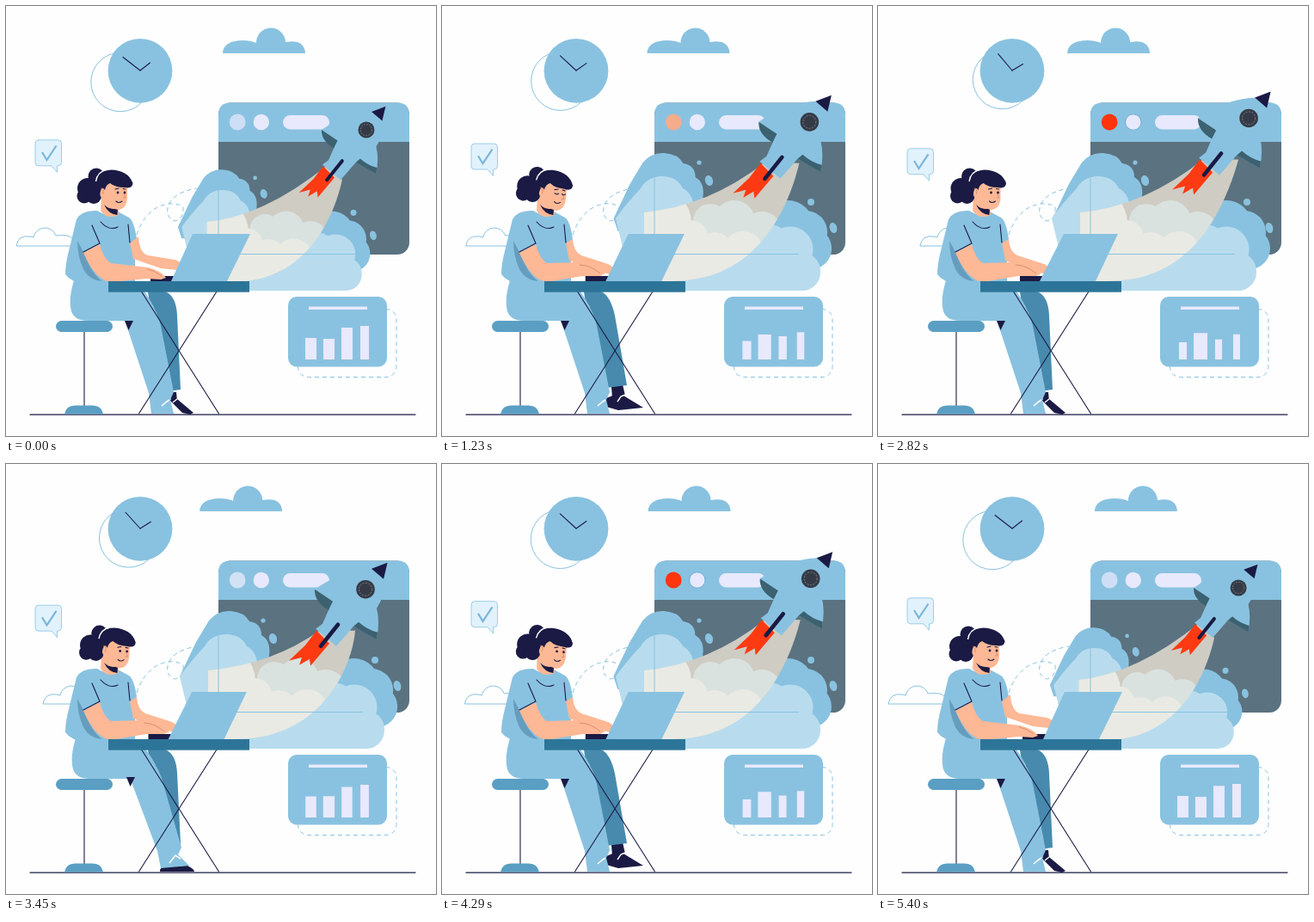
An HTML page for the animation above (5.46 s loop, 500 by 500 pixels).

```html
<!DOCTYPE html>
<html lang="en">
<head>
<meta charset="utf-8">
<title>Launch day</title>
<style>
  html, body { margin: 0; width: 100%; height: 100%; overflow: hidden; background: #fefefe; }
  svg { display: block; width: 100%; height: 100%; }
  .blue { fill: #89c2e0; }
  .mid { fill: #5a9fc3; }
  .dark { fill: #478aad; }
  .navy { fill: #1a1a44; }
  .skin { fill: #fdb895; }
  .pale { fill: #e8e9fc; }
  .light { fill: #b8dcee; }
  .ink { fill: none; stroke: #1a1a44; stroke-width: 1.1; stroke-linecap: round; }
  .thin { fill: none; stroke: #89c2e0; stroke-width: 1; }
  .dash { stroke-dasharray: 5 4; }
  .crease { fill: none; stroke: #c97f66; stroke-width: .7; }
</style>
</head>
<body>
<svg viewBox="0 0 500 500">
  <defs><clipPath id="trailClip"><path id="trail"/></clipPath></defs>

  <path id="topCloud" class="blue" d="M252 55C252 45 262 40 275 40Q285 40 291 43A17 17 0 0 1 325 42Q347 38 348 55Z"/>
  <path id="sideCloud" class="thin" d="M12 279Q14 266 28 268L32 269A13.5 13.5 0 0 1 58 267Q72 265 77 270Q83 272 84 279Z"/>

  <circle id="ring" class="thin" r="34.2"/>
  <circle class="blue" cx="156" cy="75.300" r="37.400"/>
  <path id="minute" class="ink" d="M156 75L136 59.500"/>
  <path id="hour" class="ink" d="M156 75L167.500 66"/>

  <g id="note">
    <path fill="#e1f2fd" stroke="#89c2e0" stroke-width=".8" d="M38 155.800H60.500Q64.500 155.800 64.500 159.800V181.800Q64.500 185.800 60.500 185.800H59.500V193.300L53 185.800H38Q34 185.800 34 181.800V159.800Q34 155.800 38 155.800Z"/>
    <path fill="none" stroke="#7bb6d9" stroke-width="2.200" d="M42 170L47.500 179L58.500 162.500"/>
  </g>

  <rect x="247" y="112.500" width="222" height="176.500" rx="14" fill="#5b7280"/>
  <path class="blue" d="M247 158V126.500Q247 112.500 261 112.500H455Q469 112.500 469 126.500V158Z"/>
  <circle id="lamp" cx="269.200" cy="135" r="9.400"/>
  <circle id="lamp2" class="pale" cx="296.800" cy="135" r="9.200" stroke="#5aa4d2" stroke-width=".8"/>
  <rect class="pale" x="322" y="127" width="54" height="16.500" rx="8.200"/>

  <path class="thin dash" d="M152 266Q160 242 178 233Q196 226 206 234Q207 248 196 250Q186 246 188 235Q192 217 222 212"/>

  <g id="smoke">
    <g class="blue">
      <path id="backLeft" d="M203 247L222 207L237 182Q247 170 262 171Q278 172 284 183Q298 185 298 199Q309 205 307 222Q306 235 300 240L290 262H208Z"/>
      <g id="backRight">
        <circle cx="385" cy="262" r="24"/><circle cx="405" cy="256" r="30"/>
        <circle cx="426" cy="263" r="25"/><circle cx="432" cy="282" r="24"/>
      </g>
      <circle cx="299" cy="182" r="2.600"/><circle cx="429" cy="228" r="4"/>
      <ellipse cx="310.500" cy="203" rx="4.500" ry="6.200" transform="rotate(-15 310.500 203)"/>
      <ellipse cx="455" cy="258" rx="4.300" ry="6.200" transform="rotate(-15 455 258)"/>
    </g>
    <g class="light">
      <path d="M222 331L202 247Q214 230 231 212Q239 198 256 198Q273 198 280 212Q294 219 292 240L300 331Z"/>
      <circle cx="380" cy="281" r="27"/><circle cx="405" cy="283" r="26.500"/>
      <rect x="218" y="287" width="222" height="44" rx="21"/>
    </g>
    <g clip-path="url(#trailClip)">
      <rect x="200" y="120" width="260" height="220" fill="#cfccc3"/>
      <g fill="#d9e2df">
        <circle cx="312" cy="250" r="20"/><circle cx="340" cy="250" r="24"/>
        <circle cx="372" cy="262" r="23"/><rect x="300" y="258" width="110" height="70"/>
      </g>
      <g fill="#eaeae4">
        <circle cx="250" cy="252" r="40"/><circle cx="289" cy="269" r="20"/><circle cx="317" cy="283" r="20"/>
        <circle cx="350" cy="286" r="24"/><rect x="230" y="284" width="170" height="50"/>
      </g>
    </g>
  </g>
  <path class="thin" d="M247 200V288.500H415"/>

  <g id="rocket">
    <path fill="#fd3a12" d="M-57 48L-70 65L-89 83L-74 79L-77 88L-65 81L-64 89L-42 63Z"/>
    <path class="blue" d="M7 -24Q-28 -22 -59 0L-42 22L-50 40L-58 46L-34 66L-26 57L-14 43L13 57Q17 38 13 22Q23 8 21 -13Z"/>
    <path fill="#3c6170" d="M-59 0L-38 14L-43 24Q-60 14 -59 0ZM13 58L-14 43L-8 38Q2 47 14 50Z"/>
    <path class="navy" d="M7 -24L25.500 -31L21 -12Z"/>
    <circle r="10.800" fill="#353b46"/>
    <circle r="7.500" fill="none" stroke="#89929b" stroke-width=".8" stroke-dasharray="2 1.500"/>
    <path class="ink" style="stroke-width:4.600" d="M-52 66L-32 41"/>
  </g>

  <rect class="thin dash" x="339.500" y="352.500" width="114.500" height="79" rx="12"/>
  <rect class="blue" x="328" y="338" width="115" height="81.500" rx="10"/>
  <path class="pale" d="M352 349.500H420V353H352Z"/>
  <path id="bars" class="pale"/>

  <path class="ink" style="stroke-width:1.300" d="M28 475.100H476"/>

  <path class="ink" d="M91 379V465"/>
  <path class="mid" d="M68 474.500Q70 464.500 80 464.500H101Q111 464.500 113 474.500Z"/>
  <rect class="mid" x="58" y="366" width="66" height="13" rx="6.500"/>

  <g id="backFoot">
    <path id="ankle" class="navy"/>
    <path id="shoe" class="navy"/>
    <path id="shoeLace" fill="none" stroke="#fff" stroke-width="1.400"/>
  </g>
  <path id="backLeg" class="dark"/>
  <path id="flatShoe" class="navy" d="M179 474Q178 468 188 468L211 467Q219 471 219 474Z"/>
  <path id="frontLeg" class="blue"/>
  <path id="lace" fill="none" stroke="#fff" stroke-width="1.600"/>
  <path id="seat" class="blue" d="M80 316Q72 340 76 355Q80 366 95 366H141L172 350Q164 334 150 320Z"/>
  <path id="shadow" class="navy" d="M138 366H148L142.500 377Z"/>
  <path class="ink" d="M157.500 332L247.500 474M245 332L154.500 474"/>

  <path class="blue" d="M106 238Q88 237 82 248L73 285Q69 300 69 312Q76 322 92 322H150V293L147 278L152 271Q149 250 143 246L130 239Q118 246 106 238Z"/>
  <path id="farArm" class="skin"/>
  <path fill="#669dbf" d="M83 273L91 288Q100 312 112 320Q97 319 90 306Q83 291 83 273Z"/>
  <path class="ink" d="M110 251Q120 262 130 257M100 255L109 276L90 286M142 254L144 275"/>
  <rect id="keys" class="navy" y="314" width="28" height="6"/>
  <path id="nearArm" class="skin"/>
  <path id="finger" class="crease"/>

  <path class="skin" d="M111 220L110 238Q117 249 131 243L130 230Z"/>
  <path class="navy" d="M114 231Q121 238 130 235L129.500 243Q119 242 114 231Z"/>
  <g id="head">
    <g class="navy">
      <circle cx="95" cy="212" r="12"/><circle cx="91" cy="221" r="8.500"/>
      <circle cx="102" cy="221" r="9"/><circle cx="105" cy="198" r="9.500"/>
    </g>
    <path class="skin" d="M109 210Q122 200 141 207L141 222Q141 235 131 237Q120 236 114 225Q107 222 109 210Z"/>
    <path class="navy" d="M104 210Q101 192 122 190.500Q142 191 147.500 206Q147 213 138 211Q127 211 121 206Q116 208 115 214Q110 207 109 222Q104 220 104 210Z"/>
    <path fill="none" stroke="#fff" stroke-width="1.400" d="M104.500 204Q106 193 117 190"/>
    <path class="crease" d="M110 212Q114 211 113 219M137 217L139 223L136 223"/>
    <path class="ink" d="M127 213L131 212M136 212.500L139 213M128 227Q131 230 135 227"/>
    <g id="eyes" class="navy"><circle cx="130" cy="217" r="1.400"/><circle cx="138" cy="217" r="1.400"/></g>
    <path id="lids" class="ink" d="M127.500 217Q130 219 132 217M136 217Q138 219 140 217"/>
  </g>

  <path id="laptop" class="blue"/>
  <rect x="119" y="320" width="164" height="12.700" fill="#2d7598"/>
</svg>

<script>
const LOOP = 5460;
const $ = id => document.getElementById(id);
const clamp = v => Math.min(1, Math.max(0, v));
const smooth = v => (v = clamp(v)) * v * (3 - 2 * v);
const lerp = (a, b, t) => a + (b - a) * t;
const wave = p => (1 - Math.cos(2 * Math.PI * p)) / 2;
const set = (id, name, value) => $(id).setAttribute(name, value);
const move = (id, x, y) => set(id, 'transform', `translate(${x} ${y})`);

// Blends two paths with the same commands
function blend(a, b, t) {
  const number = /-?[\d.]+/g, ends = b.match(number);
  let i = 0;
  return a.replace(number, v => lerp(+v, +ends[i++], t).toFixed(2));
}

const poses = {
  backLeg: ['M165 332L185 332Q198 337 199 360L203 446L188 448L172 380Z',
            'M165 332L185 332Q196 337 201 360L215 441L191 444L172 380Z'],
  ankle: ['M189 449L198 449L199 459L193 461Z', 'M197 443L210 440L213 453L198 456Z'],
  shoe: ['M190 458L199 457L218 473L214 475L205 473Z', 'M191 456L206 450L234 467L205 470L191 466Z'],
  shoeLace: ['M194 461L199 457L199 457', 'M204 460L208 454L213 452'],
  frontLeg: ['M118 332L148 330Q172 338 180 372L195 449L191 458L195 474L169 474L166 450L137 362Z',
             'M118 332L148 330Q174 338 183 372L204 446L200 454L213 467L180 470L176 450L143 362Z'],
  lace: ['M181 465L187 460L190 458', 'M190 464L197 455L203 459'],
  farArm: ['M144 276L154 268Q155 287 165 290L196 295Q204 297 203 301L199 307L180 305L148 294Z',
           'M144 276L152 271Q153 286 162 290L190 299Q199 302 199 306L195 312L176 306L148 296Z'],
  nearArm: ['M90 287L109 277Q114 295 122 299L165 304Q181 308 186 316L180 318L163 317L122 321Q104 319 90 287Z',
            'M90 287L109 277Q114 295 122 299L156 298Q175 298 190 311L184 314L163 314L122 321Q104 319 90 287Z'],
  finger: ['M164 306Q172 307 181 314', 'M160 301Q172 301 184 311'],
  laptop: ['M192 320L217 265L284 265L257 320Z', 'M188 320L216 265L279 265L253 320Z']
};
const pose = (id, t) => set(id, 'd', blend(...poses[id], t));

// Each bar: x, top, width
const bars = [
  [[348, 386, 13], [350, 391, 9]],
  [[369, 387, 13], [367, 380, 16]],
  [[390, 374, 13], [392, 388, 8]],
  [[412, 372, 10], [413, 382, 8]]
];
const lampColors = [
  [0, [205, 222, 245]], [.14, [221, 225, 220]], [.3, [255, 53, 14]], [.57, [255, 53, 14]],
  [.68, [244, 176, 143]], [.8, [221, 225, 220]], [.9, [208, 226, 245]], [1, [205, 222, 245]]
];
function lampColor(p) {
  const i = lampColors.findIndex(c => c[0] > p), [a, from] = lampColors[i - 1], [b, to] = lampColors[i];
  return `rgb(${from.map((v, j) => Math.round(lerp(v, to[j], (p - a) / (b - a))))})`;
}

function drawLaunch(slow, beat, grow) {
  const size = lerp(.88, 1, grow), rest = 1 - grow;
  const ox = 221, oy = 331;
  set('smoke', 'transform', `translate(${ox} ${oy}) scale(${size}) translate(${-ox} ${-oy})`);
  move('backLeft', -6 * (1 - slow), 0);
  move('backRight', -5 * (1 - slow), 0);

  const x = lerp(437, 416.5 + 15 * beat, size), y = lerp(119, 147.5 - 17.5 * beat, size);
  set('rocket', 'transform', `translate(${x} ${y}) scale(${size})`);

  // The trail stays attached to the rocket while the smoke scales
  const local = (px, py) => `${ox + (px - ox) / size} ${oy + (py - oy) / size}`;
  const left = local(x - 52 * size, y + 47 * size);
  const right = local(x - 12 - 16 * rest, y + 48 + 10 * rest);
  set('trail', 'd', `M235 240Q310 233 ${left}L${right}C402 240 365 312 283 319L235 322Z`);
}

function draw(t) {
  const p = t / LOOP, p2 = p * 2 % 1, p3 = p * 3 % 1;
  const slow = wave(p), beat = wave(p3);
  const grow = smooth(Math.min(t, 5400 - t) / 1000);
  const swing = smooth((.25 - Math.abs(p2 - .5)) / .17);
  const step = smooth((.2 - Math.abs(p2 - .25)) / .15);

  move('topCloud', -32 * slow, 0);
  move('sideCloud', 37 * slow, 0);
  move('note', 0, 10 * slow);
  set('ring', 'cx', 133 + 11.5 * slow);
  set('ring', 'cy', 88.5 - 3 * slow);
  set('minute', 'transform', `rotate(${12 * slow} 156 75)`);
  set('hour', 'transform', `rotate(${7 * slow} 156 75)`);

  set('lamp', 'fill', lampColor(p3));
  set('lamp2', 'stroke-opacity', smooth((p3 - .2) / .1) * smooth((.68 - p3) / .1));
  set('bars', 'd', bars.map(([a, b]) => {
    const [x, y, w] = a.map((v, i) => lerp(v, b[i], beat));
    return `M${x} 411V${y}h${w}V411Z`;
  }).join(''));

  drawLaunch(slow, beat, grow);

  for (const id of ['backLeg', 'ankle', 'shoe', 'shoeLace']) pose(id, swing);
  for (const id of ['frontLeg', 'lace']) pose(id, step);
  for (const id of ['farArm', 'nearArm', 'finger']) pose(id, grow);
  pose('laptop', slow);
  move('seat', 2 * step, 0);
  move('shadow', 2 * step, -2 * step);
  set('keys', 'x', 168 - 3 * slow);
  set('backFoot', 'opacity', 1 - step);
  set('flatShoe', 'opacity', step);

  const blink = Math.abs(p2 - .45) < .035;
  set('head', 'transform', `translate(${1.5 * grow} 0) rotate(${6 * wave(p2)} 122 238)`);
  set('eyes', 'opacity', blink ? 0 : 1);
  set('lids', 'opacity', blink ? 1 : 0);
}

const start = performance.now();
function frame() {
  draw((performance.now() - start) % LOOP);
  requestAnimationFrame(frame);
}
frame();
</script>
</body>
</html>
```
